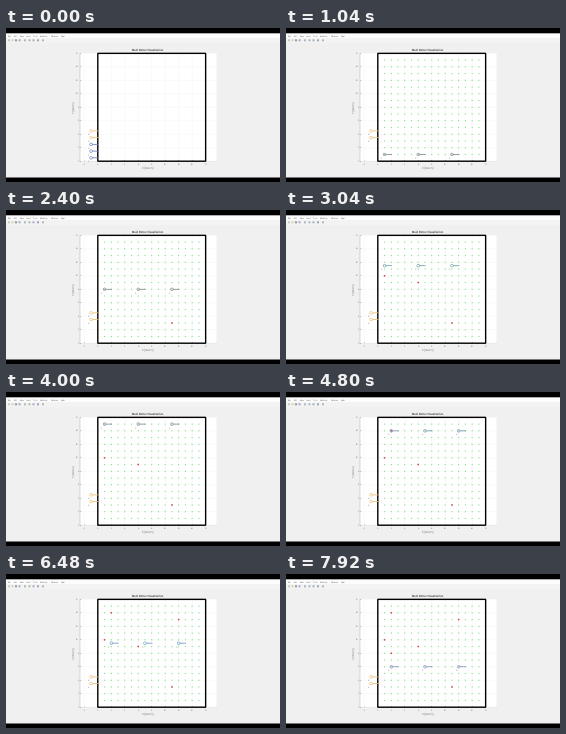
A matplotlib script for the animation above (8 s loop, 274 by 154 pixels).

```python
import matplotlib.pyplot as plt
from matplotlib.animation import FuncAnimation
from matplotlib.collections import PatchCollection
from matplotlib.patches import Circle, Rectangle

W, H, DPI = 274, 154, 100
FRAMES, INTERVAL = 100, 80
UNIT = 6.74          # pixels per meter
GRAY = "#f0f0f0"

plt.rcParams.update({"font.family": "Liberation Sans", "text.hinting": "none"})
fig = plt.figure(figsize=(W / DPI, H / DPI), dpi=DPI, facecolor=GRAY)
ax = fig.add_axes([0, 0, 1, 1])
ax.set(xlim=(0, W), ylim=(H, 0))
ax.axis("off")


def pt(px):
    return px * 72 / DPI


def sx(u):
    return 91.8 + UNIT * u


def sy(v):
    return 133.2 - UNIT * v


def box(x, y, w, h, color):
    ax.add_patch(Rectangle((x, y), w, h, fc=color, lw=0, snap=False))


def label(x, y, s, px=2.3, **kw):
    kw = {"ha": "center", "va": "center", "color": "#707070", **kw}
    return ax.text(x, y, s, fontsize=pt(px), **kw)


def line(xs, ys, color, px, **kw):
    return ax.plot(xs, ys, color=color, lw=pt(px), solid_capstyle="butt",
                   snap=False, **kw)[0]


def dots(cells, radius, color, zorder):
    circles = [Circle((sx(u), sy(v)), radius) for u, v in cells]
    return ax.add_collection(PatchCollection(circles, fc=color, lw=0, zorder=zorder))


def draw_window():
    box(0, 5.3, W, 4.7, "#fcfcfc")
    box(0, 10, W, 5, "#f3f3f3")
    box(0, 0, W, 5.3, "black")
    box(0, 149.5, W, 4.5, "black")
    menus = ["File", "Edit", "View", "Insert", "Tools", "Desktop", "Window", "Help"]
    for x, name in zip([2, 8, 14, 20, 27, 34, 44.5, 55], menus):
        label(x, 8.5, name, 2.3, ha="left", va="baseline")
    icons = ["#c5cbd4", "#e6cf8e", "#8898c0", "#a8aeb4", "#a9bcbc",
             "#b4b4b4", "#9fb0cf", "#a5a5a5", "#b8b8b8"]
    for x, color in zip([2, 5.5, 9, 12.5, 18, 22.5, 26.5, 31, 36], icons):
        box(x, 11.3, 2, 2, color)


def draw_axes():
    left, right, top, bottom = 74, 210.5, sy(16), sy(0)
    box(left, top, right - left, bottom - top, "white")
    line([left, left, right], [top, bottom, bottom], "#a0a0a0", 0.4)
    for tick in range(-2, 17, 2):
        line([sx(tick)] * 2, [top, bottom], "#f9f9f9", 0.8)
        line([sx(tick)] * 2, [bottom, bottom - 1.2], "#777777", 0.4)
        label(sx(tick), 136, tick)
        if tick >= 0:
            line([left, right], [sy(tick)] * 2, "#f9f9f9", 0.8)
            line([left, left + 1.2], [sy(tick)] * 2, "#777777", 0.4)
            label(72.8, sy(tick), tick, ha="right")
    label(142, 22.6, "Multi Robot Visualization", 2.6, weight="bold", color="#404040")
    label(142, 139.8, "X [meters]", 2.5)
    label(67.5, 79, "Y [meters]", 2.5, rotation=90)
    ax.add_patch(Rectangle((sx(0), top), 16 * UNIT, 16 * UNIT, fill=False,
                           ec="black", lw=pt(1.4), snap=False, zorder=4))


class Robot:
    def __init__(self, number, home, color):
        self.home = home
        self.ring = ax.add_patch(Circle((0, 0), 1.3, fill=False, lw=pt(0.6), zorder=6))
        self.ray = line([], [], color, 0.8, zorder=5)
        self.tag = label(0, 0, number, 2.4, zorder=6)
        self.place(*home, color)

    def place(self, u, v, color):
        x, y = sx(u), sy(v)
        self.ring.center = x, y
        self.ray.set_data([x + 1.3, x + 7.4], [y, y])
        self.tag.set_position((x - 2.6, y + 3.9))
        self.ring.set_edgecolor(color)
        self.ray.set_color(color)


# Frames at which the team advances half a meter
START = 13
CLIMB = [*range(14, 17), 19, *range(21, 36), *range(37, 46)]
SHIFT = [52, 54]
DESCEND = [56, 58, 61, 63, 66, 68, 71, 74, 77, 79, 81, 84, 86, 89, 91, 94, 96, 99]
FOUND = {(11, 3): 19, (6, 9): 32, (1, 10): 34, (2, 14): 58, (12, 13): 63, (2, 8): 89}
TINTS = [(0, "#6a76b4"), (13, "#84848c"), (32, "#6a9ea2"), (44, "#7e8296"),
         (60, "#7090ac"), (76, "#6898c0"), (92, "#868ac0")]


def metres(steps, frame):
    return 0.5 * sum(step <= frame for step in steps)


draw_window()
draw_axes()
cells = [(u, v) for u in range(1, 16) for v in range(1, 16)]
grid = dots(cells, 0.6, "#6ee678", 3)
targets = {cell: dots([cell], 0.85, "#d84848", 4) for cell in FOUND}
team = [Robot(i + 1, (-1, 0.5 + i), TINTS[0][1]) for i in range(3)]
reserve = [Robot(i + 1, (-1, 0.5 + i), "#ecbc72") for i in (3, 4)]


def update(frame):
    running = frame >= START
    grid.set_visible(running)
    tint = [color for start, color in TINTS if start <= frame][-1]
    u = 1 + metres(SHIFT, frame)
    v = 1 + metres(CLIMB, frame) - metres(DESCEND, frame)
    for i, robot in enumerate(team):
        robot.place(*((u + 5 * i, v) if running else robot.home), tint)
    for cell, dot in targets.items():
        dot.set_visible(frame >= FOUND[cell])
    return []


anim = FuncAnimation(fig, update, frames=FRAMES, interval=INTERVAL,
                     repeat=True, repeat_delay=0, blit=False)
plt.show()
```
